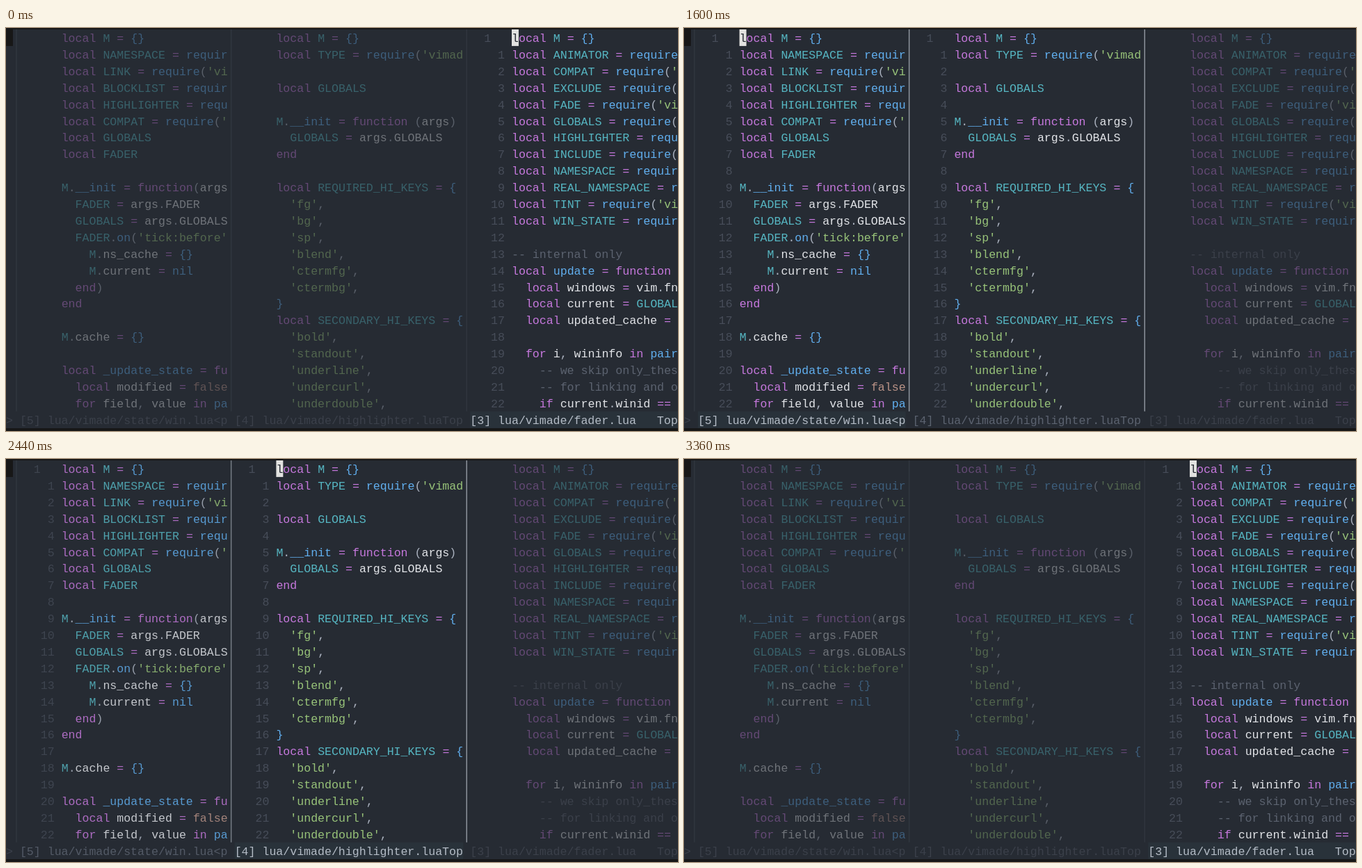
These frames come from a looping animation (966 px wide and 580 px high, 3.96 s). An HTML page with a canvas:

```html
<!DOCTYPE html>
<html lang="en">
<head>
<meta charset="utf-8">
<title>Editor windows fading with focus</title>
<style>
  html, body { margin: 0; width: 100%; height: 100%; overflow: hidden; background: #262b33; }
  canvas { display: block; }
</style>
</head>
<body>
<canvas id="stage" width="966" height="580"></canvas>
<script>
const ctx = document.getElementById('stage').getContext('2d');
const LOOP = 3960, STEP = 40, FADE_STEPS = 4, DIM = 0.39;
const CELL = 966 / 97, ROW = 23.9, TOP = 2, STATUS_ROW = 23;
const FAMILY = '"Liberation Mono", monospace';
const COLOR = {
  bg: '#262b33', edge: '#171717', cursor: '#e2e2e0',
  keyword: '#c678dd', name: '#56b6c2', call: '#61afef', string: '#98c379',
  text: '#e2e4e8', punct: '#abb2bf', constant: '#bb9488',
  comment: '#5c6370', number: '#474d59',
  status: '#b4bcc6', statusBg: '#29323a', sep: '#8c929b', sepDim: '#30363f'
};

const load = name => `local ${name} = require('vimade')`;

const left = {
  col: 8, width: 24, sepCol: 32, statusCol: 2, statusEnd: 32,
  status: '[5] lua/vimade/state/win.lua<p',
  lines: ['local M = {}',
    ...['NAMESPACE', 'LINK', 'BLOCKLIST', 'HIGHLIGHTER', 'COMPAT'].map(load),
    'local GLOBALS', 'local FADER', '',
    'M.__init = function(args)', '  FADER = args.FADER', '  GLOBALS = args.GLOBALS',
    "  FADER.on('tick:before'", '    M.ns_cache = {}', '    M.current = nil',
    '  end)', 'end', '', 'M.cache = {}', '',
    'local _update_state = function', '  local modified = false',
    '  for field, value in pairs']
};
const middle = {
  col: 39, width: 27, sepCol: 66, statusCol: 33, statusEnd: 66,
  status: '[4] lua/vimade/highlighter.luaTop',
  lines: ['local M = {}', load('TYPE'), '', 'local GLOBALS', '',
    'M.__init = function (args)', '  GLOBALS = args.GLOBALS', 'end', '',
    'local REQUIRED_HI_KEYS = {',
    ...['fg', 'bg', 'sp', 'blend', 'ctermfg', 'ctermbg'].map(key => `  '${key}',`),
    '}', 'local SECONDARY_HI_KEYS = {',
    ...['bold', 'standout', 'underline', 'undercurl', 'underdouble'].map(key => `  '${key}',`)]
};
const right = {
  col: 73, width: 24, statusCol: 67, statusEnd: 97,
  status: '[3] lua/vimade/fader.lua   Top',
  lines: ['local M = {}',
    ...['ANIMATOR', 'COMPAT', 'EXCLUDE', 'FADE', 'GLOBALS', 'HIGHLIGHTER', 'INCLUDE',
      'NAMESPACE', 'REAL_NAMESPACE', 'TINT', 'WIN_STATE'].map(load),
    '', '-- internal only', 'local update = function',
    '  local windows = vim.fn', '  local current = GLOBALS', '  local updated_cache =',
    '', '  for i, wininfo in pairs', '    -- we skip only_these',
    '    -- for linking and o', '    if current.winid ==']
};
const panes = [left, middle, right];

const focusOrder = [
  { at: 0, pane: right }, { at: 800, pane: middle }, { at: 1600, pane: left },
  { at: 2400, pane: middle }, { at: 3200, pane: right }
];

function tokenColor(token, before) {
  if (token.startsWith('--')) return COLOR.comment;
  if (token[0] === "'") return COLOR.string;
  if (/^(local|function|end|for|in|if|=+)$/.test(token)) return COLOR.keyword;
  if (/^(require|pairs|nil|update|_update_state|__init|on|[{}])$/.test(token)) return COLOR.call;
  if (token === 'false') return COLOR.constant;
  if (/^[A-Z_]+$/.test(token) && before !== '.') return COLOR.name;
  return /\w/.test(token) ? COLOR.text : COLOR.punct;
}

function tokenize(line, width) {
  return [...line.matchAll(/--.*|'[^']*'|\w+|=+|[^\s\w]/g)]
    .filter(match => match.index < width)
    .map(match => ({
      col: match.index,
      text: match[0].slice(0, width - match.index),
      color: tokenColor(match[0], line[match.index - 1])
    }));
}
panes.forEach(pane => pane.tokens = pane.lines.map(line => tokenize(line, pane.width)));

// Size the font so that one character fills one cell.
ctx.font = `100px ${FAMILY}`;
ctx.font = `${100 * CELL / ctx.measureText('M').width}px ${FAMILY}`;

function fill(x, y, w, h, color) {
  ctx.fillStyle = color;
  ctx.fillRect(x, y, w, h);
}

function write(text, col, row, color, alpha = 1) {
  ctx.globalAlpha = alpha;
  ctx.fillStyle = color;
  ctx.fillText(text, col * CELL, TOP + row * ROW + 18);
  ctx.globalAlpha = 1;
}

function separator(col, level) {
  const x = (col + 0.5) * CELL - 0.75, height = STATUS_ROW * ROW;
  fill(x, TOP, 1.5, height, COLOR.sepDim);
  ctx.globalAlpha = level;
  fill(x, TOP, 1.5, height, COLOR.sep);
  ctx.globalAlpha = 1;
}

// 1 while focused, then down to 0 in equal steps after focus leaves.
function brightness(pane, time, current) {
  if (focusOrder[current].pane === pane) return 1;
  for (let i = current - 1; i >= 0; i--) {
    if (focusOrder[i].pane === pane) {
      const steps = Math.floor((time - focusOrder[i + 1].at) / STEP);
      return 1 - Math.min(FADE_STEPS, steps) / FADE_STEPS;
    }
  }
  return 0;
}

function drawPane(pane, level, focused) {
  const alpha = DIM + (1 - DIM) * level;
  pane.tokens.forEach((tokens, row) => {
    const label = String(row || 1);
    const labelCol = row ? pane.col - 1 - label.length : pane.col - 4;
    write(label, labelCol, row, COLOR.number, level);
    tokens.forEach(({ text, col, color }) => write(text, pane.col + col, row, color, alpha));
  });
  if (pane.sepCol) separator(pane.sepCol, level);
  if (focused) {
    const x = pane.statusCol * CELL;
    fill(x, TOP + STATUS_ROW * ROW, pane.statusEnd * CELL - x, ROW, COLOR.statusBg);
    fill(pane.col * CELL, TOP, CELL, ROW, COLOR.cursor);
    write('l', pane.col, 0, COLOR.bg);
  }
  write(pane.status, pane.statusCol, STATUS_ROW, focused ? COLOR.status : COLOR.comment, alpha);
}

function draw(time) {
  const current = focusOrder.findLastIndex(focus => time >= focus.at);
  fill(0, 0, 966, 580, COLOR.bg);
  fill(0, 0, 966, TOP, COLOR.edge);
  fill(0, 576, 966, 4, COLOR.edge);
  fill(0, TOP, CELL, ROW, COLOR.edge);
  separator(1, 0);
  write('>', 0, STATUS_ROW, COLOR.comment, DIM);
  panes.forEach(pane =>
    drawPane(pane, brightness(pane, time, current), focusOrder[current].pane === pane));
}

const start = performance.now();
function tick() {
  draw((performance.now() - start) % LOOP);
  requestAnimationFrame(tick);
}
tick();
</script>
</body>
</html>
```
